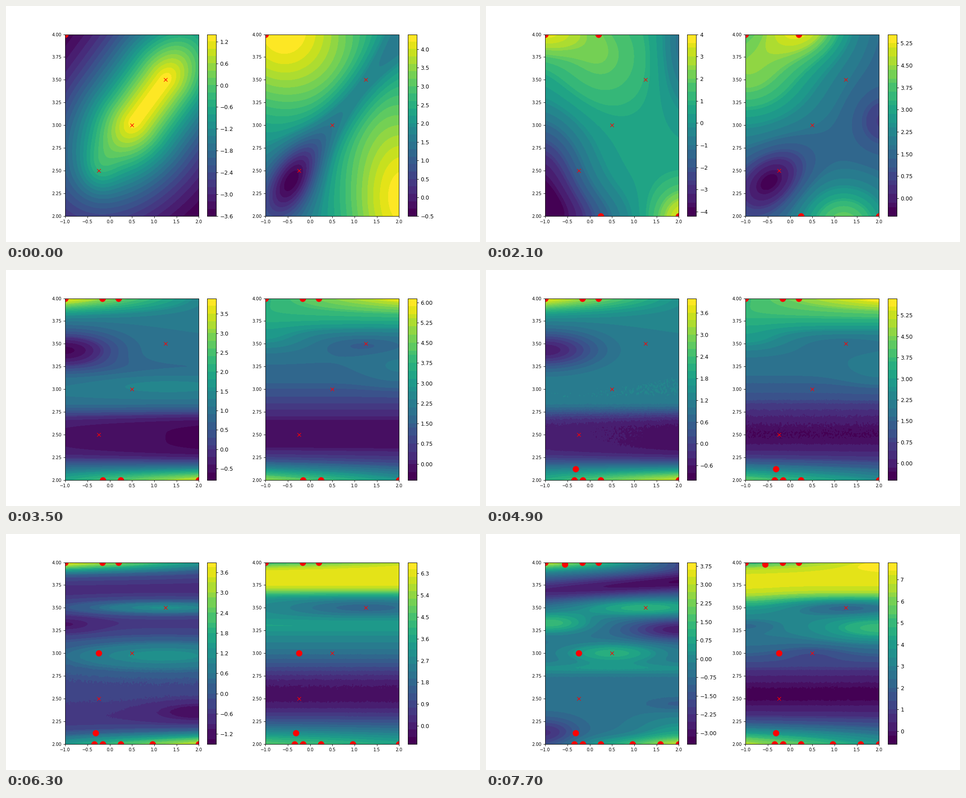
A matplotlib script for the animation above (8000 ms loop, 1058 by 529 pixels).

```python
import math

import numpy as np
import matplotlib.pyplot as plt
from matplotlib.animation import FuncAnimation
from matplotlib.colors import ListedColormap

W, H, DPI = 1058, 529, 92
BASE = 1200               # layout width the panels are aligned to
PT = BASE / 100 and W / 12 / DPI
X0, X1, Y0, Y1 = -1, 2, 2, 4
N = 150
X, Y = np.meshgrid(np.linspace(X0, X1, N), np.linspace(Y0, Y1, N))
VIRIDIS = plt.get_cmap("viridis", 25)
rng = np.random.default_rng(4)


# Building blocks of the surfaces

def bump(cx, cy, sx, sy, slant=0):
    dy = Y - cy
    return np.exp(-((X - cx - slant * dy) / sx) ** 2 - (dy / sy) ** 2)


def band(cy, sy, power=2):
    return np.exp(-np.abs((Y - cy) / sy) ** power)


def rise(cy, width):
    return 1 / (1 + np.exp(-(Y - cy) / width))


def grain(amp):
    """Numerical noise in the lower middle of the domain."""
    return amp * rng.standard_normal(X.shape) * band(2.64, .22)


def crest():
    """Elongated peak that falls off around a slanted segment."""
    dx, dy = X - .9, 2.05 * (Y - 3.27)
    along, across = .59 * dx + .807 * dy, .807 * dx - .59 * dy
    r = np.hypot(across, .65 * np.maximum(np.abs(along) - .55, 0))
    return 1.4 - 5.6 * (1 - np.exp(-.625 * r ** 1.4))


def cliff():
    """Slope that drops away to the left of a slanted line."""
    return -.55 * np.log1p(np.exp((.5 + .75 * (Y - 3) - X) * 3.1 / .55))


def left_mid(lift):
    return (1.1 + .1 * lift + (1.9 - .8 * X) * band(4.03, .17)
            - 1.75 * bump(-1, 3.43, 1.15, .2)
            - .2 * (1 - lift) * band(3.25, .1)
            + .3 * (1 - lift) * bump(1.3, 3.03, 1.6, .1)
            - (1.6 + .08 * X + .15 * lift) * band(2.47, .3, 4)
            + (1.35 + .5 * X) * band(1.98, .13))


def right_mid(lift):
    return (1.85 + 2 * rise(3.68, .06) + (.6 + .8 * X) * band(4.04, .16)
            + .8 * bump(-1, 3.55, 1, .15) + .4 * bump(2, 3.22, .8, .2)
            - (.5 - .25 * lift) * bump(1.2, 3.48, .8, .09)
            - 2.15 * band(2.5, .42)
            + (3 - .7 * X) * (1 - .2 * lift) * band(1.96, .2))


def right_late(height, width, floor):
    return (3.1 + height * band(3.835, width, 4)
            - 3.4 * band(2.55, .42) + floor * band(1.96, .2))


# Key surfaces by step, each with the ends of its colour scale

LEFT = {
    0: (crest() + .55 * bump(-.25, 2.5, .4, .25), -3.6, 1.4),
    1: (1.1 + cliff() - 1.6 * bump(.1, 1.95, .6, .4)
        + 2.4 * bump(2.1, 2, .75, .5) - 1.6 * bump(2.1, 4, .6, .4), -5.8, 3.4),
    3: (.6 + 2.8 * bump(-1.1, 4.05, .9, .28) + 1.4 * bump(.2, 3.75, 1.1, .55)
        - 2.1 * bump(2.2, 3.9, .6, .7) - 4.2 * bump(-1.2, 2.35, 1.1, .75)
        - 2.2 * bump(-.3, 1.9, 1.2, .4) + 3.2 * bump(2.15, 1.95, .7, .35),
        -4.2, 4),
    5: (left_mid(0), -.8, 3.9),
    7: (left_mid(1) + grain(.05), -1, 4),
    9: (-.65 + (3.7 - .85 * X) * band(4.02, .13)
        + 1.75 * bump(1.25, 3.5, 2.2, .085) - .5 * bump(-1, 3.31, .8, .1)
        + 1.75 * bump(1.2, 2.98, 3, .2) + .35 * band(2.65, .25)
        - .7 * bump(2, 2.36, 1.1, .12) + (2.8 + .7 * X) * band(1.97, .15)
        + grain(.045), -1.5, 3.9),
    11: (-.6 + (2.5 - 1.8 * X) * band(4.03, .11)
         - (2.2 + .2 * X) * band(3.72 + .033 * X, .13)
         + 1.8 * bump(1.25, 3.5, 1.5, .1) + 2 * bump(-.9, 3.33, .9, .11)
         - 2.2 * bump(2, 3.26, 1.1, .12) + 1.7 * bump(.5, 3, 1.1, .11)
         + .8 * band(2.83, .07) - .6 * bump(2, 2.44, .7, .07)
         - 1.7 * bump(-1, 2.13, .7, .15) + bump(2, 2.12, 1, .2)
         + (.9 + 1.1 * X) * band(1.98, .1) + grain(.02), -3.45, 3.9),
}
RIGHT = {
    0: (1.5 + 2.9 * bump(-.6, 4.05, 1.8, .96) + 2.85 * bump(2.1, 2.2, 1.45, 1.18)
        - 1.1 * bump(.9, 3.25, .55, 1, 1.5)
        - 1.7 * bump(-.4, 2.38, .55, .42, .6), -.5, 4.4),
    1: (1.6 + 2.9 * bump(-1.2, 4.1, 1.6, .6) + 3 * bump(1.3, 2, .8, .8)
        + 1.3 * bump(2.3, 2.9, .7, .5) - .3 * bump(1.5, 3.8, .4, .5)
        - 2.2 * bump(-.75, 2.22, .9, .55, .4), -.75, 4.65),
    3: (1.5 + 2.8 * bump(-1, 3.6, 1.5, .6) + 3.3 * bump(.3, 4.15, .95, .4)
        - bump(2.1, 3.05, .6, .3) - 2 * bump(-.45, 2.38, .7, .35, .8)
        + 2.7 * bump(1.2, 1.9, .95, .42), -.6, 5.55),
    5: (right_mid(0), -.6, 6.15),
    7: (right_mid(1) + grain(.06), -.6, 5.85),
    9: (right_late(3.3, .185, 1.9 - .35 * X) + .6 * (X - .8) * band(4.02, .08)
        - 1.3 * bump(1.25, 3.5, 1.8, .1) + .5 * band(3.3, .08)
        + grain(.05), -.75, 6.75),
    11: (right_late(4.2, .25, 3.4 - X) + 1.2 * (X - 1) * band(4.03, .09)
         - 1.1 * bump(1.3, 3.5, 1, .09) + bump(-1, 3.55, 1, .12)
         + 2.1 * bump(2, 3.27, 1.3, .14) - .7 * bump(-1, 3.3, .6, .06)
         - .6 * bump(.5, 3, .8, .1) + grain(.03), -.6, 7.8),
}


def stage(keys, step):
    """Surface and colour range of a step; steps without a key lie halfway."""
    if step in keys:
        return keys[step]
    (za, la, ha), (zb, lb, hb) = keys[step - 1], keys[step + 1]
    return (za + zb) / 2, (la + lb) / 2, max(ha, hb)


def bands(lo, hi):
    """Limits, band count and tick labels for about fifty round-valued bands."""
    width = next(w for w in (.1, .15, .2, .25) if w >= (hi - lo) / 51)
    first, last = math.floor(lo / width + 1e-6), round(hi / width)
    every = math.ceil((last - first + 1) / 10)
    ks = [k for k in range(first, last + 1) if k % every == 0]
    gap = width * every
    places = next(p for p in range(4) if abs(gap * 10 ** p % 1 - .5) > .499)
    labels = [f"{k * width:.{places}f}".replace("-", "\u2212") for k in ks]
    return first * width, last * width, last - first, [k * width for k in ks], labels


# One new sample per step
DOTS = np.array([
    (-1, 4), (2, 2), (.2, 4), (.25, 2), (-.16, 2), (-.17, 4), (-.35, 2),
    (-.32, 2.12), (-.25, 3), (.96, 2), (-.56, 3.98), (1.59, 2),
])
CROSSES = np.array([(1.25, 3.5), (.5, 3), (-.25, 2.5)])

PT = W / 12 / DPI  # point scale for a 12-inch-wide layout
plt.rcParams.update({
    "font.family": "DejaVu Sans", "axes.linewidth": .8 * PT,
    "xtick.major.width": .8 * PT, "ytick.major.width": .8 * PT,
    "xtick.major.size": 3.5 * PT, "ytick.major.size": 3.5 * PT,
    "xtick.major.pad": 3.5 * PT, "ytick.major.pad": 3.5 * PT,
})
fig = plt.figure(figsize=(W / DPI, H / DPI), dpi=DPI, facecolor="white")


def add_box(x, width):
    """Axes whose edges sit on whole pixels of the wider layout."""
    def edge(v):
        return (round(v) + .5) * W / BASE - .52
    left, right = edge(x), edge(x + width)
    low, high = edge(.11 * BASE / 2), edge(.88 * BASE / 2)
    return fig.add_axes((left / W, low / H, (right - left) / W, (high - low) / H))


class Panel:
    def __init__(self, col, keys):
        self.stages = [stage(keys, s) for s in range(len(DOTS))]
        slot = .775 * BASE / 2.2
        x = .125 * BASE + 1.2 * slot * col
        ax = add_box(x, .8 * slot)
        dx, dy = (X1 - X0) / (N - 1) / 2, (Y1 - Y0) / (N - 1) / 2
        self.img = ax.imshow(X, origin="lower", aspect="auto",
                             interpolation="bilinear",
                             extent=(X0 - dx, X1 + dx, Y0 - dy, Y1 + dy))
        ax.set(xlim=(X0, X1), ylim=(Y0, Y1),
               xticks=np.linspace(X0, X1, 7), yticks=np.linspace(Y0, Y1, 9))
        ax.tick_params(labelsize=8 * PT)
        ax.plot(*CROSSES.T, "x", color="red", ms=6 * PT, mew=PT)
        self.dots, = ax.plot([], [], "o", color="red", ms=10 * PT, mew=1.5 * PT)

        self.bar = add_box(x + .85 * slot, .77 * BASE / 2 / 20)
        self.strip = self.bar.imshow([[0]], origin="lower", aspect="auto",
                                     interpolation="nearest")
        self.bar.set_xticks([])
        self.bar.yaxis.tick_right()
        self.bar.tick_params(labelsize=10 * PT)

    def show(self, step):
        z, lo, hi = self.stages[step]
        lo, hi, n, ticks, labels = bands(lo, hi)
        cmap = ListedColormap(VIRIDIS((np.arange(n) + .5) / n))
        self.img.set_data(np.clip(z, lo + 1e-3, hi - 1e-3))
        self.strip.set_data(np.arange(n)[:, None] + .5)
        self.strip.set_extent((0, 1, lo, hi))
        for im, lim in ((self.img, (lo, hi)), (self.strip, (0, n))):
            im.set_cmap(cmap)
            im.set_clim(*lim)
        self.bar.set_yticks(ticks, labels)
        self.bar.set(xlim=(0, 1), ylim=(lo, hi))
        self.dots.set_data(*DOTS[:step + 1].T)


panels = [Panel(0, LEFT), Panel(1, RIGHT)]


def update(i):
    for p in panels:
        p.show(min(i // 7, len(DOTS) - 1))
    return []


anim = FuncAnimation(fig, update, frames=80, interval=100, repeat=True,
                     repeat_delay=0, init_func=lambda: update(0))
plt.show()
```
